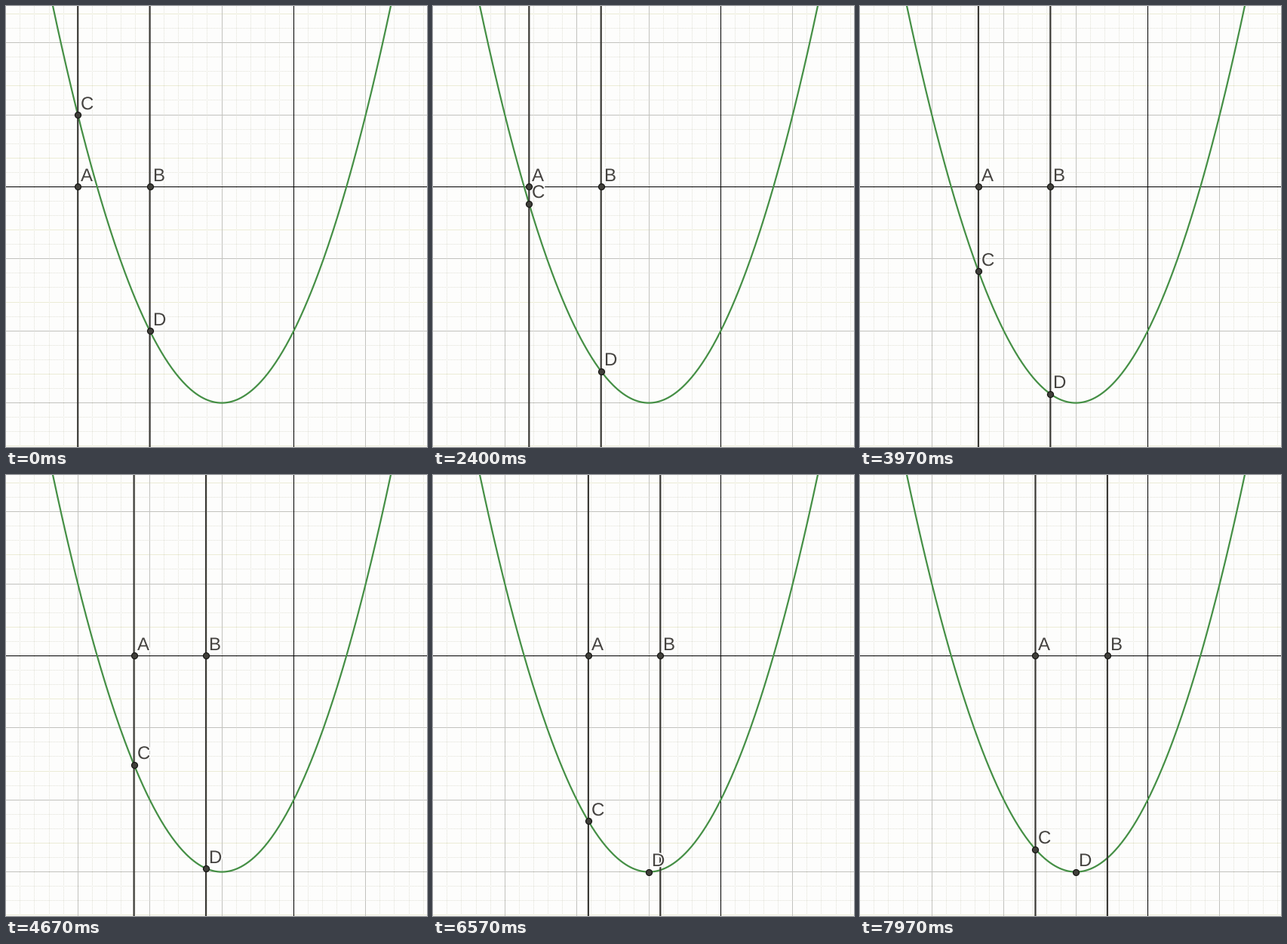
Write a matplotlib script that moves like this. It is 558x584 px and loops after 8 s.

```python
import numpy as np
import matplotlib.pyplot as plt
from matplotlib.animation import FuncAnimation
from matplotlib.collections import LineCollection
from matplotlib.patheffects import withStroke

W, H, DPI = 558, 584, 100
PX = 72 / DPI                    # points per pixel
OX, OY, UNIT = 381.4, 239.4, 95.4
FRAMES, STEP = 250, 32
START, SPEED = 0.70, 0.198       # seconds, units per second

PAPER, INK, TEXT = "#fdfdfc", "#3a3935", "#454340"
GREEN, GREY = "#458f45", "#c2c2be"
MINOR, STRONG = "#e2e2d8", "#ececd6"


def f(x):
    return (x + 1) ** 2 - 3


def to_px(x, y):
    return OX + UNIT * x, OY - UNIT * y


fig = plt.figure(figsize=(W / DPI, H / DPI), dpi=DPI, facecolor=PAPER)
ax = fig.add_axes([0, 0, 1, 1])
ax.set(xlim=(0, W), ylim=(H, 0))
ax.axis("off")


def rule(xs, ys, color, z, **kw):
    """Lines one pixel wide, centred on whole pixel columns and rows."""
    segs = [[(x, 0), (x, H)] for x in np.floor(xs) + 0.5]
    segs += [[(0, y), (W, y)] for y in np.floor(ys) + 0.5]
    lines = LineCollection(segs, colors=color, linewidths=PX, zorder=z, **kw)
    lines.set_snap(False)
    ax.add_collection(lines, autolim=False)


# Grid and axes
k = np.arange(-20, 21)
minor = k[k % 5 != 0]
strong = k[k % 5 == 2]
major = k[(k % 5 == 0) & (k != 0)]
rule(OX + UNIT * minor / 5, OY - UNIT * minor / 5, MINOR, 1, linestyles=[(0, (1, 1))])
rule([], OY - UNIT * strong / 5, STRONG, 1.1)
rule(OX + UNIT * major / 5, OY - UNIT * major / 5, GREY, 2)
rule([OX], [OY], "black", 3)

xs = np.linspace(-3.5, 1.5, 300)
ax.plot(*to_px(xs, f(xs)), color=GREEN, lw=2.2 * PX, zorder=4)

# Moving parts
bars = [ax.plot([0, 0], [-5, H + 5], color=INK, lw=2.2 * PX, snap=False, zorder=5)[0]
        for _ in range(2)]
halo = [withStroke(linewidth=3.4 * PX, foreground=PAPER)]
labels = [ax.text(0, 0, s, family="Liberation Sans", size=24 * PX, color=TEXT,
                  ha="left", va="baseline", path_effects=halo, zorder=6) for s in "ABCD"]
points = ax.plot([0] * 4, [0] * 4, "o", ms=8 * PX, mfc="#403f3a", mec="#151513",
                 mew=1.2 * PX, snap=False, zorder=7)[0]


def draw(i):
    t = i * STEP / 1000
    a = -3 + SPEED * max(0, t - START)
    b = a + 1
    top = a if f(a) >= f(b) else b
    low = min(max(a, -1), b)
    spots = [to_px(a, 0), to_px(b, 0), to_px(top, f(top)), to_px(low, f(low))]
    for bar, (x, _) in zip(bars, spots):
        bar.set_xdata([x, x])
    px, py = np.array(spots).T
    points.set_data(px, py)
    for label, x, y in zip(labels, px, py):
        label.set_position((round(x + 4), round(y - 7.3)))
    return [*bars, points, *labels]


anim = FuncAnimation(fig, draw, frames=FRAMES, interval=STEP, init_func=lambda: draw(0),
                     repeat=True, repeat_delay=0, blit=False)
plt.show()
```
